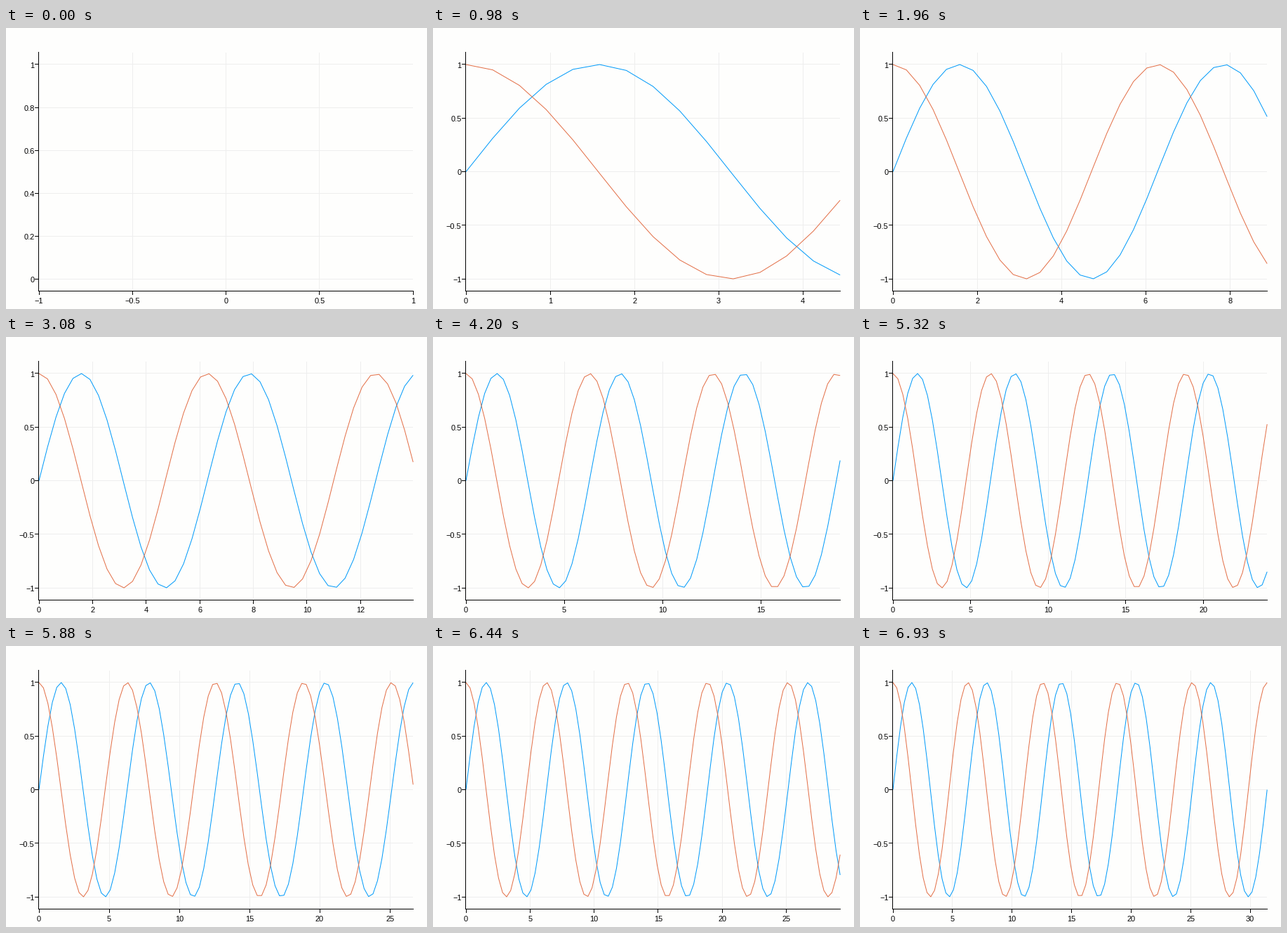
Write a matplotlib script that moves like this. It is 600 px wide and 400 px high and loops after 7000 ms.

```python
import math

import numpy as np
import matplotlib.pyplot as plt
from matplotlib.animation import FuncAnimation
from matplotlib.collections import LineCollection

DPI = 100
W, H = 600, 400
PX = 72 / DPI                                   # one pixel in points
LEFT, RIGHT, TOP, BOTTOM = 47, 580.2, 35.05, 374
PAD = 0.05 * (BOTTOM - TOP)
TICK = 5
FRAMES, INTERVAL = 100, 70

BACK, GRID, INK = "#fefefd", "#eeeeee", "#000000"
BLUE, ORANGE = "#009afa", "#e36f47"

xs = np.linspace(0, 10 * math.pi, FRAMES)
waves = [np.sin(xs), np.cos(xs)]

plt.rcParams["font.family"] = "Liberation Sans"
fig = plt.figure(figsize=(W / DPI, H / DPI), dpi=DPI, facecolor=BACK)
ax = fig.add_axes([0, 0, 1, 1])
ax.set_xlim(0, W)
ax.set_ylim(H, 0)
ax.axis("off")


def strokes(color, zorder, segments=()):
    lines = LineCollection(list(segments), colors=color, linewidths=PX,
                           zorder=zorder)
    lines.set_snap(False)
    return ax.add_collection(lines, autolim=False)


grid = strokes(GRID, 1)
ticks = strokes(INK, 3)
strokes(INK, 3, [[(46.5, 34), (46.5, 375)], [(46, 374.5), (581, 374.5)]])
curves = [ax.plot([], [], color=c, lw=PX, zorder=2, solid_joinstyle="miter",
                  solid_capstyle="butt", snap=False)[0]
          for c in (BLUE, ORANGE)]
labels = [ax.text(0, 0, "", fontsize=11 * PX, color=INK, va="baseline",
                  zorder=4) for _ in range(24)]


def tick_values(lo, hi, length, min_gap):
    """Round tick values with a step of 2, 5 or 10 times a power of ten."""
    count = min(max(length / min_gap, 4), 9) + 1
    rough = (hi - lo) / count
    base = 10 ** math.floor(math.log10(rough))
    step = base * next(m for m in (2, 5, 10) if rough <= m * base)
    first = math.ceil(lo / step - 1e-9)
    last = math.floor(hi / step + 1e-9)
    return [round(i * step, 6) for i in range(first, last + 1)]


def crisp(p):
    return math.floor(p + 1e-6) + 0.5


def update(k):
    x_lo, x_hi = (0, xs[k]) if k else (-1, 1)
    y_lo = min(w[:k + 1].min() for w in waves)
    y_hi = max(w[:k + 1].max() for w in waves)
    x_scale = (RIGHT - LEFT) / (x_hi - x_lo)
    y_scale = (BOTTOM - TOP - 2 * PAD) / (y_hi - y_lo)

    def to_x(v):
        return LEFT + (v - x_lo) * x_scale

    def to_y(v):
        return BOTTOM - PAD - (v - y_lo) * y_scale

    for curve, wave in zip(curves, waves):
        curve.set_data(to_x(xs[:k + 1]), to_y(wave[:k + 1]))
        curve.set_visible(k > 0)

    grid_lines, tick_lines, notes = [], [], []
    for v in tick_values(x_lo, x_hi, RIGHT - LEFT, 80):
        p = to_x(v)
        c = crisp(p)
        tick_lines.append([(c, 375), (c, 375 + TICK)])
        if LEFT + 1 < p < RIGHT - 1:
            grid_lines.append([(c, 35), (c, BOTTOM)])
        notes.append((v, p, 392, "center"))

    margin = PAD / y_scale
    for v in tick_values(y_lo - margin, y_hi + margin, BOTTOM - TOP, 40):
        p = to_y(v)
        c = crisp(p)
        tick_lines.append([(46 - TICK, c), (46, c)])
        if TOP + 1 < p < BOTTOM - 1:
            grid_lines.append([(LEFT, c), (580, c)])
        notes.append((v, 40.5, p + 4.8, "right"))

    grid.set_segments(grid_lines)
    ticks.set_segments(tick_lines)
    for label in labels:
        label.set_text("")
    for label, (v, x, y, align) in zip(labels, notes):
        label.set_text(f"{v:g}".replace("-", "\u2212"))
        label.set_position((x, y))
        label.set_ha(align)
    return [grid, ticks, *curves, *labels]


anim = FuncAnimation(fig, update, frames=FRAMES, interval=INTERVAL,
                     repeat=True, repeat_delay=0, blit=False)
plt.show()
```
